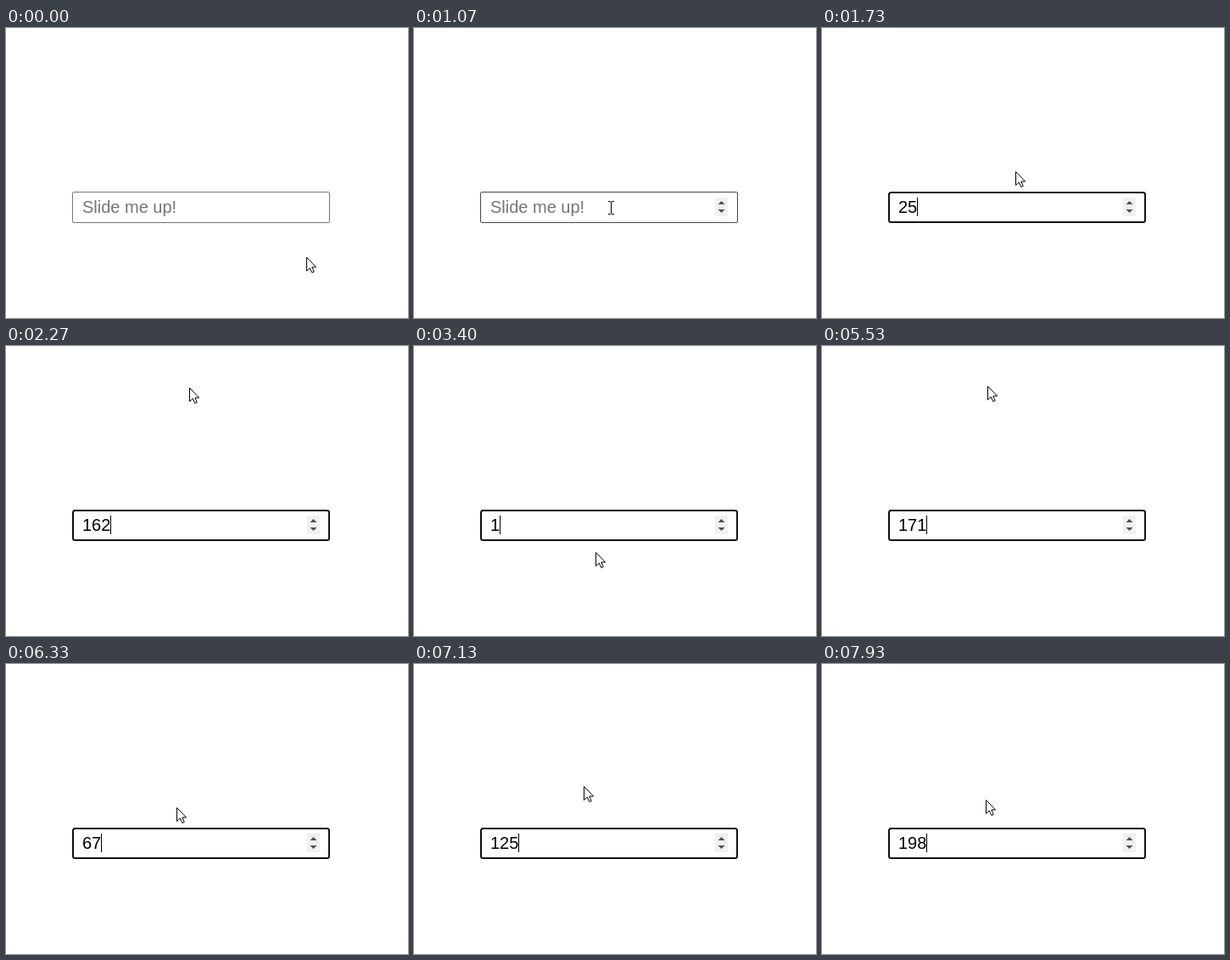
An HTML page with a canvas that plays this animation: 474x342 px, repeating every 8000 ms.

```html
<!DOCTYPE html>
<html lang="en">
<head>
<meta charset="utf-8">
<title>Slide me up!</title>
<style>
  html, body { margin: 0; width: 100%; height: 100%; overflow: hidden; background: #fff; }
  canvas { display: block; }
</style>
</head>
<body>
<canvas width="474" height="342"></canvas>
<script>
const ctx = document.querySelector('canvas').getContext('2d');
const FPS = 15, STEPS = 120;
const FIELD = { x: 78, y: 193, w: 304, h: 37 };
const FOCUS_STEP = 22, SECOND_DRAG = 99;

const linear = u => u;
const smooth = u => u * u * (3 - 2 * u);

// Pointer path: [step, x, y, easing towards this point]
const path = [
  [0, 354, 270, linear],
  [1, 349, 260, linear],
  [3, 312, 216, linear],
  [4, 296, 224, linear],
  [7, 268, 301, smooth],
  [8, 262, 293, linear],
  [10, 262, 293, linear],
  [16, 232, 211, smooth],
  [21, 232, 211, linear],
  [33, 216, 49, smooth],
  [38, 216, 49, linear],
  [54, 214, 263, smooth],
  [59, 214, 263, linear],
  [68, 196, 71, smooth],
  [69, 196, 68, linear],
  [72, 194, 58, linear],
  [77, 194, 45, smooth],
  [78, 194, 45, linear],
  [80, 194, 38, linear],
  [91, 200, 144, smooth],
  [93, 200, 144, linear],
  [95, 202, 194, linear],
  [97, 204, 217, linear],
  [99, 204, 217, linear],
  [112, 196, 86, smooth],
  [115, 196, 86, linear],
  [119, 192, 185, linear]
];

function pointerAt(step) {
  const i = Math.max(1, path.findIndex(key => key[0] >= step));
  const [s0, x0, y0] = path[i - 1];
  const [s1, x1, y1, ease] = path[i];
  const k = ease((step - s0) / (s1 - s0));
  return { x: Math.round(x0 + (x1 - x0) * k), y: Math.round(y0 + (y1 - y0) * k) };
}

// The number follows the pointer one step late and holds after each release.
function valueAt(step) {
  if (step <= FOCUS_STEP) return '';
  const [origin, release] = step < SECOND_DRAG ? [211, 92] : [67 + 217, 113];
  return String(Math.max(1, origin - pointerAt(Math.min(step - 1, release)).y));
}

function fillPath(d, color) {
  ctx.fillStyle = color;
  ctx.fill(new Path2D(d));
}

function drawField(value, hovered, focused) {
  const { x, y, w, h } = FIELD;
  const line = focused ? 2 : 1;
  ctx.beginPath();
  ctx.roundRect(x + line / 2, y + line / 2, w - line, h - line, focused ? 2.5 : 1.5);
  ctx.lineWidth = line;
  ctx.strokeStyle = focused ? '#101010' : hovered ? '#484848' : '#767676';
  ctx.stroke();

  ctx.font = '20px "Liberation Sans", Arial, sans-serif';
  ctx.fillStyle = value ? '#000' : '#757575';
  ctx.fillText(value || 'Slide me up!', 90, 218);

  if (focused) {
    ctx.fillStyle = '#000';
    ctx.fillRect(Math.round(90 + (value ? ctx.measureText(value).width : 0)), 200, 1, 22);
  }
  if (hovered || focused) {
    ctx.fillStyle = '#f0f0f0';
    ctx.fillRect(355, 200, 15, 22);
    fillPath('M358.5 208 L362.5 204 L366.5 208 Z M358.5 214 L362.5 218 L366.5 214 Z', '#505050');
  }
}

function drawPointer({ x, y }, overText) {
  ctx.save();
  ctx.translate(x, y);
  if (overText) {
    ctx.fillStyle = '#000';
    ctx.fillRect(0, -6, 1, 14);
    for (const side of [-3, 1]) {
      ctx.fillRect(side, -7, 3, 1);
      ctx.fillRect(side, 8, 3, 1);
    }
  } else {
    const arrow = new Path2D('M.5 .5 V16.5 L4.2 13 L6.8 18.5 L9.2 17.5 L6.8 12 H11.6 Z');
    ctx.fillStyle = '#fff';
    ctx.fill(arrow);
    ctx.lineWidth = 1;
    ctx.strokeStyle = '#000';
    ctx.stroke(arrow);
  }
  ctx.restore();
}

function draw(now) {
  const step = Math.floor(now * FPS / 1000) % STEPS;
  const pointer = pointerAt(step);
  const hovered = pointer.y > 194 && pointer.y < 229;
  ctx.fillStyle = '#fff';
  ctx.fillRect(0, 0, 474, 342);
  drawField(valueAt(step), hovered, step >= FOCUS_STEP);
  drawPointer(pointer, hovered);
  requestAnimationFrame(draw);
}
draw(0);
</script>
</body>
</html>
```
